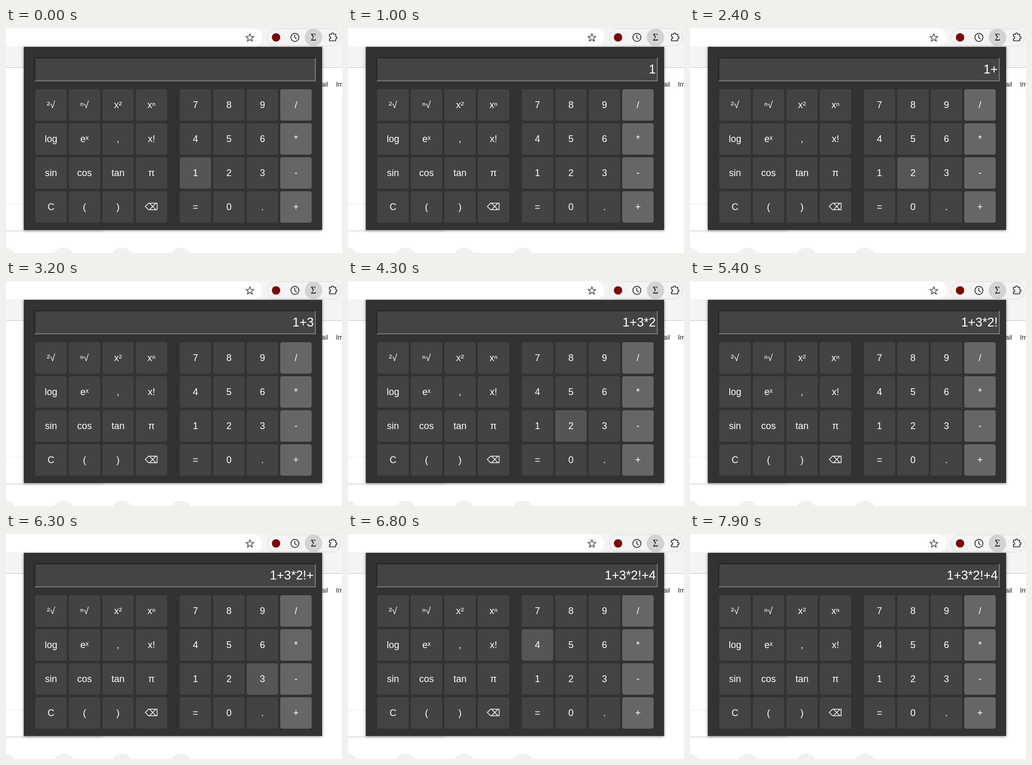
Write an HTML page with a canvas that moves like this. It is 642 px wide and 430 px high and loops after 8 s.

```html
<!DOCTYPE html>
<html lang="en">
<head>
<meta charset="utf-8">
<title>Calculator</title>
<style>
html, body { margin: 0; width: 100%; height: 100%; overflow: hidden; background: #fff; }
canvas { display: block; }
</style>
</head>
<body>
<canvas id="stage" width="642" height="430"></canvas>
<script>
const ctx = document.getElementById('stage').getContext('2d');
const LOOP = 8000;
const SANS = '"Liberation Sans", "DejaVu Sans", sans-serif';
const SERIF = '"Liberation Serif", serif';

const COLUMNS = [56, 120, 184, 248, 332, 396, 460, 524];
const KEYS = [
  ['²√', 'ⁿ√', 'x²', 'xⁿ', '7', '8', '9', '/'],
  ['log', 'eˣ', ',', 'x!', '4', '5', '6', '*'],
  ['sin', 'cos', 'tan', 'π', '1', '2', '3', '-'],
  ['C', '(', ')', '⌫', '=', '0', '.', '+']
];

// [time, characters entered]
const ENTRY = '1+3*2!+4';
const TYPED = [700, 2100, 2900, 3600, 4300, 5100, 6100, 6800];

// [time, key under the pointer]
const HOVER = [
  [0, '1'], [900, '2'], [1000, ''],
  [2300, '3'], [2400, '2'], [2600, '3'], [3200, ''],
  [3700, '3'], [3800, '2'], [4500, '1'], [4600, ''], [4700, 'x!'],
  [5300, '6'], [5400, ''],
  [6300, '3'], [6400, '5'], [6500, '4'], [7900, '']
];

function rect(x, y, w, h, color) {
  ctx.fillStyle = color;
  ctx.fillRect(x, y, w, h);
}

function rounded(x, y, w, h, r, fill, stroke) {
  ctx.beginPath();
  ctx.roundRect(x, y, w, h, r);
  paint(fill, stroke);
}

function circle(x, y, r, fill, stroke, width) {
  ctx.beginPath();
  ctx.arc(x, y, r, 0, Math.PI * 2);
  paint(fill, stroke, width);
}

function paint(fill, stroke, width = 1) {
  if (fill) {
    ctx.fillStyle = fill;
    ctx.fill();
  }
  if (stroke) {
    ctx.strokeStyle = stroke;
    ctx.lineWidth = width;
    ctx.stroke();
  }
}

function text(str, x, y, size, color, align = 'center', family = SANS) {
  ctx.font = `${size}px ${family}`;
  ctx.textAlign = align;
  ctx.fillStyle = color;
  ctx.fillText(str, x, y);
}

function withShadow(color, blur, dy, draw) {
  ctx.save();
  ctx.shadowColor = color;
  ctx.shadowBlur = blur;
  ctx.shadowOffsetY = dy;
  draw();
  ctx.restore();
}

function star(x, y, outer, inner) {
  ctx.beginPath();
  for (let i = 0; i < 10; i++) {
    const a = -Math.PI / 2 + i * Math.PI / 5;
    const r = i % 2 ? inner : outer;
    ctx.lineTo(x + r * Math.cos(a), y + r * Math.sin(a));
  }
  ctx.closePath();
  paint(null, '#474747', 1.4);
}

function drawToolbar() {
  rect(0, 0, 642, 76, '#f4f4f4');
  rounded(-30, 1, 520, 34, 17, '#fff');
  rect(0, 75, 642, 1, '#c9c9c9');
  star(466, 18.7, 7.7, 3.4);

  rounded(499.5, 1.5, 140, 33, 16.5, '#f4f4f4', '#dadada');
  circle(516, 18, 8, '#7c0508');
  circle(552, 18, 7.7, null, '#222', 1.5);
  ctx.beginPath();
  ctx.moveTo(551.7, 13);
  ctx.lineTo(551.7, 18.4);
  ctx.lineTo(555.5, 21.3);
  paint(null, '#222', 1.4);

  circle(587.5, 18, 16.7, '#d3d3d3');
  text('Σ', 587.5, 24, 18, '#111', 'center', SERIF);

  ctx.lineJoin = 'round';
  ctx.strokeStyle = '#333';
  ctx.lineWidth = 1.6;
  ctx.stroke(new Path2D('M618 12h4v-.5a2 2 0 0 1 4 0v.5h4v4.5h.5a2 2 0 0 1 0 4' +
    'h-.5v4h-12v-4h.3a2.1 2.1 0 0 0 0-4.2h-.3z'));
  ctx.lineJoin = 'miter';
}

function drawPage() {
  rect(0, 0, 642, 430, '#fff');
  drawToolbar();
  text('ail', 602.5, 112, 13, '#222', 'left');
  text('Im', 630.5, 112, 13, '#222', 'left');
  withShadow('rgba(0,0,0,.22)', 4, 1, () => rounded(-40, 337.5, 226, 49, 3, '#fff'));
  for (let i = 0; i < 4; i++) circle(-2 + 112 * i, 440, 20.5, '#f1f1f1');
}

function drawDisplay(value) {
  rect(54, 56, 538, 46, '#767676');
  ctx.beginPath();
  ctx.moveTo(54, 102);
  ctx.lineTo(54, 56);
  ctx.lineTo(592, 56);
  ctx.lineTo(590, 58);
  ctx.lineTo(56, 58);
  ctx.lineTo(56, 100);
  paint('#242424');
  rect(56, 58, 534, 42, '#444');
  text(value, 588, 87, 24, '#fff', 'right');
}

function drawKeys(hovered) {
  KEYS.forEach((row, r) => row.forEach((label, c) => {
    const x = COLUMNS[c], y = 117 + 65 * r;
    const color = c === 7 ? '#666' : label === hovered ? '#555' : '#434343';
    rounded(x, y, 60, 60, 4, color);
    text(label, x + 30, y + 36, 18, '#fff');
  }));
}

function draw(t) {
  const count = TYPED.filter(time => time <= t).length;
  const hovered = HOVER.filter(step => step[0] <= t).pop()[1];
  drawPage();
  withShadow('rgba(0,0,0,.5)', 5, 1, () => rect(34, 36, 570, 350, '#323232'));
  drawDisplay(ENTRY.slice(0, count));
  drawKeys(hovered);
}

const start = performance.now();
function tick() {
  draw((performance.now() - start) % LOOP);
  requestAnimationFrame(tick);
}
tick();
</script>
</body>
</html>
```
